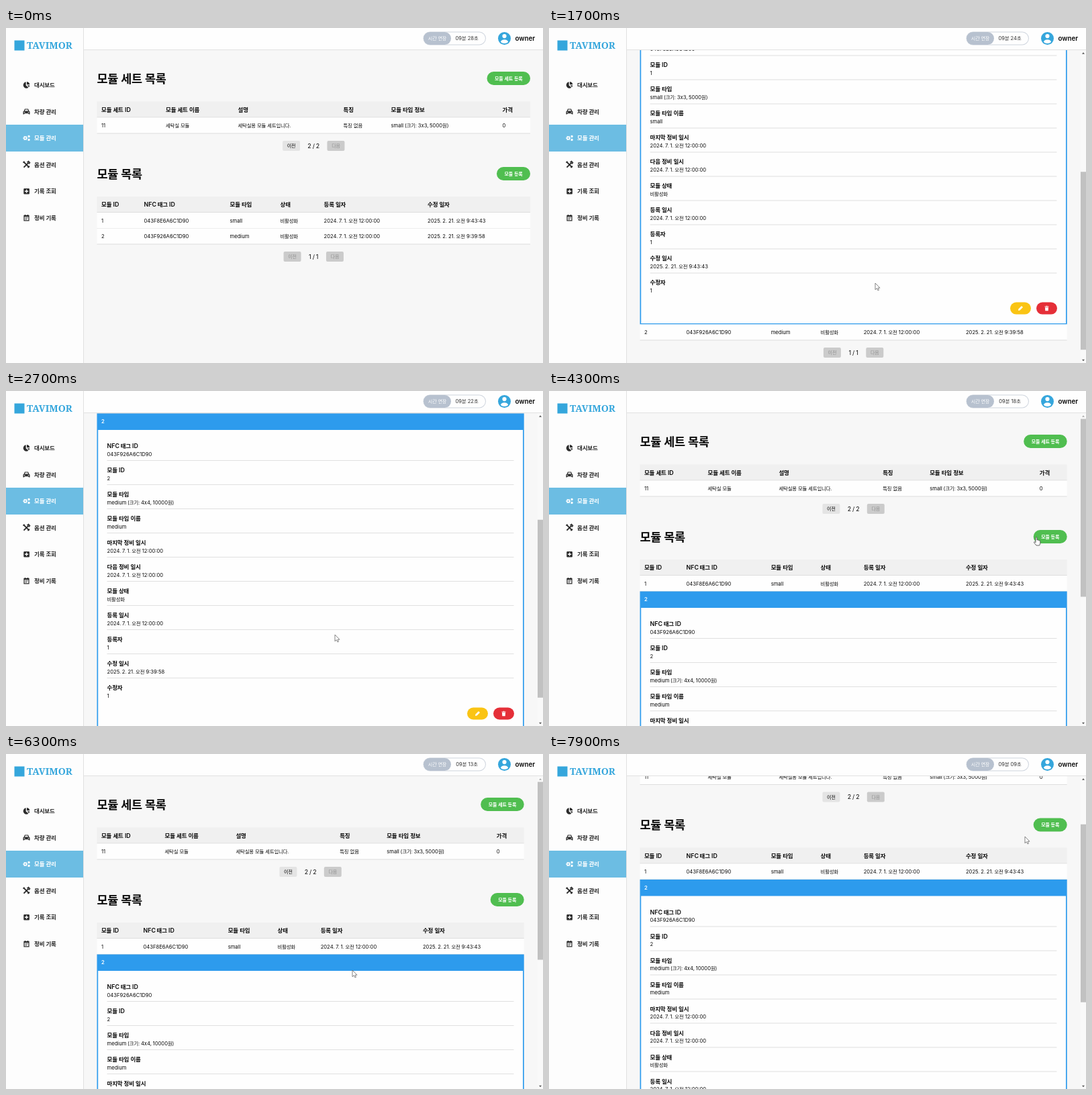
These frames come from a looping animation (800 by 499 pixels, 8000 ms). An HTML page with a canvas:

```html
<!DOCTYPE html>
<html lang="ko">
<head>
<meta charset="utf-8">
<title>모듈 관리</title>
<style>
  html, body { margin: 0; width: 100%; height: 100%; overflow: hidden; background: #f7f7f7; }
  canvas { display: block; }
</style>
</head>
<body>
<canvas id="stage" width="800" height="499"></canvas>
<script>
const ctx = document.getElementById('stage').getContext('2d');
const LOOP = 8000, STEP = 100;
const BLUE = '#2d9bed', SKY = '#35a6dc', GREEN = '#50be50', INK = '#0a0a0a';
const LEFT = 135.5, WIDE = 645.5, NARROW = 636.2;
const BODY = 7.65, LABEL = 8.85, TITLE = 18.2;

// Scroll position: [time, y]
const scrollKeys = [[0, 0], [650, 0], [950, 241.5], [1300, 241.5], [1900, 326.5], [2300, 326.5],
  [2600, 265], [2900, 265], [3600, 0], [6500, 0], [7000, 111.5]];
// Pointer: [time, x, y, hand until the next key]
const pointerKeys = [[100, 520, 440, 0], [400, 490, 278, 1], [1300, 490, 278, 0], [1700, 486, 380, 0],
  [2050, 480, 432, 1], [2350, 480, 432, 0], [2600, 490, 363, 0], [2900, 490, 363, 0],
  [3600, 640, 280, 0], [4000, 722, 217, 1], [4600, 722, 217, 0], [5200, 600, 295, 0],
  [5700, 500, 318, 0], [6100, 516, 322, 0], [7100, 516, 322, 0], [7700, 709, 123, 0]];

const modules = [
  { id: '1', tag: '043F8E6A6C1D90', type: 'small', size: '3x3, 5000원', edited: '2025. 2. 21. 오전 9:43:43' },
  { id: '2', tag: '043F926A6C1D90', type: 'medium', size: '4x4, 10000원', edited: '2025. 2. 21. 오전 9:39:58' }
];
const MADE = '2024. 7. 1. 오전 12:00:00', STATE = '비활성화';
const setCols = [142, 238, 345.5, 502.5, 573.5, 739.5];
const moduleCols = [142, 205.5, 333.5, 408.5, 473.5, 628];
const menu = ['대시보드', '차량 관리', '모듈 관리', '옵션 관리', '기록 조회', '정비 기록'];

function sample(keys, t) {
  const n = keys.findIndex(k => k[0] > t);
  if (n < 0) return keys[keys.length - 1].slice(1);
  if (n === 0) return null;
  const a = keys[n - 1], b = keys[n];
  const p = (t - a[0]) / (b[0] - a[0]), e = p * p * (3 - 2 * p);
  return a.slice(1).map((v, i) => v + (b[i + 1] - v) * e);
}

function box(x, y, w, h, color, r = 0) {
  ctx.fillStyle = color;
  ctx.beginPath();
  ctx.roundRect(x, y, w, h, r);
  ctx.fill();
}

function shape(d, x, y, fill, stroke, width = 1) {
  const path = new Path2D(d);
  ctx.save();
  ctx.translate(x, y);
  if (fill) { ctx.fillStyle = fill; ctx.fill(path); }
  if (stroke) { ctx.strokeStyle = stroke; ctx.lineWidth = width; ctx.stroke(path); }
  ctx.restore();
}

// y is the middle of the line; Hangul and word gaps are set a little tight
function text(s, x, y, size, weight = 400, color = INK, align = 0) {
  const setRun = run => {
    const hangul = /[가-힣]/.test(run), px = hangul ? size * .96 : size;
    ctx.font = `${weight} ${px}px Inter, "Noto Sans CJK KR", "Noto Sans CJK", sans-serif`;
    ctx.letterSpacing = hangul ? `${-.02 * size}px` : '0px';
    ctx.wordSpacing = `${-.06 * size}px`;
    return ctx.measureText(run).width;
  };
  const runs = s.split(/([가-힣]+)/).filter(Boolean);
  x -= align * runs.reduce((sum, run) => sum + setRun(run), 0);
  ctx.fillStyle = color;
  for (const run of runs) {
    const w = setRun(run);
    ctx.fillText(run, x, y + size * .36);
    x += w;
  }
  ctx.letterSpacing = ctx.wordSpacing = '0px';
}

function greenButton(label, right, y, w) {
  box(right - w, y - 10, w, 20, GREEN, 10);
  text(label, right - w / 2, y + .2, 7.3, 600, '#fff', .5);
}

function tableHead(labels, cols, y, width, toX) {
  box(LEFT, y, width, 23.5, '#f0f0f0');
  labels.forEach((s, i) => text(s, toX(cols[i]), y + 12, LABEL, 600));
  box(LEFT, y + 23, width, 1, '#dedede');
}

function tableRow(values, cols, y, width, toX) {
  box(LEFT, y, width, 23.5, '#fefefe');
  values.forEach((s, i) => text(s, toX(cols[i]), y + 11.8, BODY));
  box(LEFT, y + 23, width, 1, '#dedede');
}

function pager(label, mid, y, gap, prevOn) {
  box(mid - gap - 26, y - 7.5, 26, 15, prevOn ? '#e4e4e4' : '#cbcbcb', 2);
  text('이전', mid - gap - 13, y, 7.3, prevOn ? 500 : 400, prevOn ? INK : '#929292', .5);
  text(label, mid, y, LABEL, 400, INK, .5);
  box(mid + gap, y - 7.5, 26, 15, '#cbcbcb', 2);
  text('다음', mid + gap + 13, y, 7.3, 400, '#929292', .5);
}

function detail(m, y) {
  const fields = [['NFC 태그 ID', m.tag], ['모듈 ID', m.id], ['모듈 타입', `${m.type} (크기: ${m.size})`],
    ['모듈 타입 이름', m.type], ['마지막 정비 일시', MADE], ['다음 정비 일시', MADE], ['모듈 상태', STATE],
    ['등록 일시', MADE], ['등록자', '1'], ['수정 일시', m.edited], ['수정자', '1']];
  box(LEFT, y, NARROW, 471, BLUE);
  box(LEFT + 1.7, y + 24.5, NARROW - 3.4, 445, '#fefefe');
  text(m.id, 142, y + 11.8, 7.7, 600, '#fff');
  fields.forEach(([label, value], i) => {
    const top = y + 48.5 + i * 36;
    text(label, 150.5, top, LABEL, 600);
    text(value, 150.5, top + 12.2, BODY);
    if (i < 10) box(150.5, Math.round(top + 21), 606, 1, '#e0e0e0');
  });
  const by = y + 447;
  box(687, by - 9, 31, 18, '#fac414', 9);
  shape('M-3.5 3.5L-3 1L1.5-3.5L3.5-1.5L-1 3Z', 702.5, by, '#fff');
  box(726, by - 9, 31, 18, '#e52f38', 9);
  shape('M-3-3H-1L-.6-3.7H.6L1-3H3V-2H-3ZM-2.5-1.4H2.5L2.2 3.7H-2.2Z', 741.5, by, '#fff');
  return 471;
}

function content(open, scroll) {
  const width = open < 0 ? WIDE : NARROW, right = LEFT + width, mid = LEFT + width / 2;
  const toX = x => LEFT + (x - LEFT) * width / WIDE;
  ctx.save();
  ctx.beginPath();
  ctx.rect(116, 33, 684, 466);
  ctx.clip();
  ctx.translate(0, -scroll);

  text('모듈 세트 목록', LEFT, 75.5, TITLE, 700);
  greenButton('모듈 세트 등록', right, 75, 64.5);
  tableHead(['모듈 세트 ID', '모듈 세트 이름', '설명', '특징', '모듈 타입 정보', '가격'], setCols, 109.5, width, toX);
  tableRow(['11', '세탁실 모듈', '세탁실용 모듈 세트입니다.', '특징 없음', 'small (크기: 3x3, 5000원)', '0'],
    setCols, 133.5, width, toX);
  pager('2 / 2', mid, 175.5, 20.2, true);

  text('모듈 목록', LEFT, 217.3, TITLE, 700);
  greenButton('모듈 등록', right, 217, 50);
  tableHead(['모듈 ID', 'NFC 태그 ID', '모듈 타입', '상태', '등록 일자', '수정 일자'], moduleCols, 251, width, toX);
  let y = 275;
  modules.forEach((m, i) => {
    if (i === open) y += detail(m, y);
    else {
      tableRow([m.id, m.tag, m.type, STATE, MADE, m.edited], moduleCols, y, width, toX);
      y += 23.5;
    }
  });
  pager('1 / 1', mid, y + 18.5, 18.7, false);
  ctx.restore();

  if (open >= 0) {
    box(792, 33, 8, 466, '#f9f9f9');
    box(792, 41.5 + scroll * .567, 8, 265, '#c1c1c1');
    shape('M-2 1.2L0-1.2L2 1.2Z', 796, 37.5, scroll ? '#555' : '#aaa');
    shape('M-2-1.2L0 1.2L2-1.2Z', 796, 495, scroll > 326 ? '#aaa' : '#555');
  }
}

function gear(x, y, r) {
  ctx.strokeStyle = '#fff';
  ctx.lineWidth = 1.5;
  ctx.beginPath();
  ctx.arc(x, y, r * .65, 0, 7);
  for (let a = 0; a < 6.2; a += Math.PI / 3) {
    ctx.moveTo(x + Math.cos(a) * r * .8, y + Math.sin(a) * r * .8);
    ctx.lineTo(x + Math.cos(a) * r * 1.2, y + Math.sin(a) * r * 1.2);
  }
  ctx.stroke();
}

const icons = [
  y => {
    shape('M-.8-4.5V.6L3 4A4.8 4.8 0 1 1-.8-4.5ZM.5-4.8A4.8 4.8 0 0 1 4.8-.6H.5ZM1 .6H4.8A4.8 4.8 0 0 1 3.6 3.2Z', 30.5, y, '#2b2b2b');
  },
  y => {
    shape('M-5 0L-3.8-.8L-2.6-4H2.6L3.8-.8L5 0V4H3.2V2.8H-3.2V4H-5Z', 30.5, y, '#2b2b2b');
    shape('M-2.5-.9L-1.8-2.8H1.8L2.5-.9ZM-3.8.5H-2.2V1.7H-3.8ZM2.2.5H3.8V1.7H2.2Z', 30.5, y, '#fdfdfd');
  },
  y => { gear(28.7, y, 2.8); gear(34, y - 2.5, 1.4); gear(34, y + 2.5, 1.4); },
  y => {
    shape('M-4-4L4 4M3.3-3.3L-4 4', 30.5, y, null, '#2b2b2b', 1.9);
    shape('M1-3.5L3-5L5-3L3.5-1M-5-3L-3-5M2 4.5L4.5 2', 30.5, y, null, '#2b2b2b', 1.5);
  },
  y => {
    box(26.3, y - 4.3, 8.6, 8.6, '#2b2b2b', 1);
    shape('M-2.6 0H2.6M0-2.6V2.6', 30.6, y, null, '#fff', 1.4);
  },
  y => {
    shape('M-3.5-3.5H3.5V4H-3.5ZM-3.5-2.2H3.5M-2-4.8V-3M2-4.8V-3', 30.5, y, null, '#2b2b2b', 1.2);
    shape('M-2 0H2M-2 2H.8', 30.5, y, null, '#2b2b2b', .9);
  }
];

function chrome(t) {
  box(0, 0, 800, 32, '#fefefe');
  box(115, 32, 685, 1, '#e1e1e1');
  box(0, 0, 115, 499, '#fdfdfd');
  box(115, 0, 1, 499, '#e1e1e1');

  box(12.5, 18.5, 15, 15, SKY);
  ctx.font = '700 14.1px "Noto Serif", serif';
  ctx.fillStyle = SKY;
  ctx.fillText('TAVIMOR', 31, 31);

  box(0, 144, 115, 40, '#6cbde3');
  menu.forEach((label, i) => {
    const y = 84.8 + i * 39.6;
    icons[i](y);
    text(label, 42, y, LABEL, 600, i === 2 ? '#fff' : '#222');
  });

  box(621.5, 5.5, 93.5, 20, '#cfd5de', 10);
  box(622.5, 6.5, 91.5, 18, '#fefefe', 9);
  box(622, 6, 41, 19, '#b7c1cf', 9.5);
  text('시간 연장', 642.5, 15.6, 7.4, 500, '#fff', .5);
  const left = Math.floor(28.8 - t * .00242);
  text(`09분 ${String(left).padStart(2, '0')}초`, 686.5, 15.6, 7.6, 400, '#333', .5);

  box(733, 6, 19, 19, SKY, 9.5);
  box(739.4, 9, 6.2, 6.2, '#fff', 3.1);
  shape('M-5.6 3.8C-4.5-.8 4.5-.8 5.6 3.8C2.8 6.8-2.8 6.8-5.6 3.8Z', 742.5, 17, '#fff');
  text('owner', 758.5, 15.6, 9.8, 600);
}

function pointer(t) {
  const p = sample(pointerKeys, t);
  if (!p) return;
  const key = pointerKeys.filter(k => k[0] <= t).pop();
  if (key[3]) {
    shape('M3 7V1.5Q4-.2 5 1.5V5Q6 4 6.8 5.3Q8 4.7 8.5 6Q9.8 5.5 9.8 7.3V10L8.7 13H4L.7 9Q.3 7.3 1.7 7.6L3 8.8Z',
      p[0], p[1], '#fff', '#555', .9);
  } else {
    shape('M0 0V9.8L2.3 7.7L4 11L5.5 10.3L4 7.2H7Z', p[0], p[1], '#fff', '#666', .8);
  }
}

function draw(now) {
  const t = Math.floor(now % LOOP / STEP) * STEP;
  const open = t < 600 ? -1 : t < 2300 ? 0 : 1;
  box(0, 0, 800, 499, '#f7f7f7');
  content(open, sample(scrollKeys, t)[0]);
  chrome(t);
  pointer(t);
}

const start = performance.now();
function tick() {
  draw(performance.now() - start);
  requestAnimationFrame(tick);
}
tick();
</script>
</body>
</html>
```
